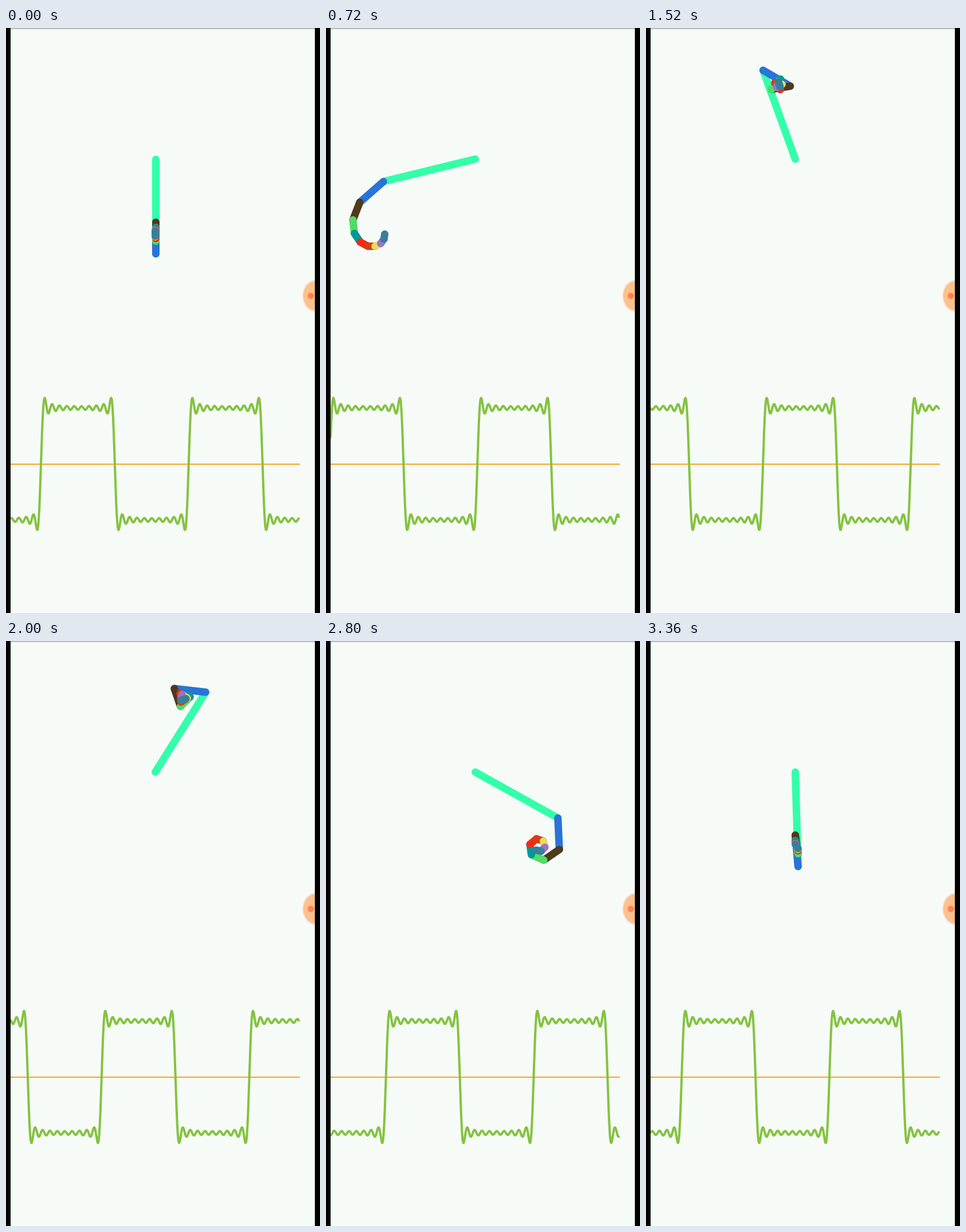
Write a matplotlib script that moves like this. It is 548 by 1022 pixels and loops after 3400 ms.

```python
import numpy as np
import matplotlib.pyplot as plt
from matplotlib.animation import FuncAnimation
from matplotlib.patches import Ellipse, Rectangle

W, H, DPI = 548, 1022, 64
FRAMES, INTERVAL = 85, 40

PIVOT = (260.5, 229)
RADIUS = 165
COLORS = ["#33ffaa", "#2874d8", "#50391c", "#4fdd64", "#009999",
          "#f22c14", "#d43e10", "#e8dc60", "#a070cc", "#34809a"]
ORDERS = 2 * np.arange(len(COLORS)) + 1

WAVE_MID, WAVE_AMP = 761.6, 124.5
WAVE_START, WAVE_PERIOD = 61, 257.8
WAVE_X = np.arange(8, 511.5, 0.5)

# The rotation speed drifts a little around one turn per loop.
KEY_FRAMES = [0, 11, 26, 38, 50, 70, 84]
KEY_TURN = [0, 46.7, 110, 160.1, 212.2, 299.1, 358.3]


def px(width):
    return width * 72 / DPI


def turn(frame):
    return np.radians(np.interp(frame, KEY_FRAMES, KEY_TURN))


def arm_joints(angle):
    x = np.cumsum(RADIUS / ORDERS * np.cos(ORDERS * angle))
    y = np.cumsum(RADIUS / ORDERS * np.sin(ORDERS * angle))
    return (PIVOT[0] + np.append(0, x), PIVOT[1] + np.append(0, y))


def wave(shift):
    phase = 2 * np.pi * (WAVE_X - WAVE_START) / WAVE_PERIOD + shift
    series = (np.sin(np.outer(ORDERS, phase)) / ORDERS[:, None]).sum(axis=0)
    return WAVE_MID - WAVE_AMP * series


fig = plt.figure(figsize=(W / DPI, H / DPI), dpi=DPI, facecolor="#f7fbf7")
ax = fig.add_axes([0, 0, 1, 1])
ax.set_xlim(0, W)
ax.set_ylim(H, 0)
ax.axis("off")


def rect(x, y, w, h, color, z):
    ax.add_patch(Rectangle((x, y), w, h, fc=color, lw=0, zorder=z))


def oval(x, y, rx, ry, color, z):
    ax.add_patch(Ellipse((x, y), 2 * rx, 2 * ry, fc=color, lw=0, zorder=z))


rect(0, 0, W, 2, "#b9bab9", 1)
rect(0, 0, 8, H, "black", 9)
rect(539, 0, 9, H, "black", 9)

oval(540.5, 468, 23.5, 28, "#fbe3cd", 5)
oval(540.5, 468, 21.5, 26, "#fcc18e", 6)
oval(532, 468, 5.5, 5.5, "#ff8350", 7)

ax.plot([8, 513], [761.7, 761.7], color="#f5a623", lw=px(2),
        solid_capstyle="butt", zorder=2)
curve, = ax.plot([], [], color="#84c341", lw=px(4),
                 solid_capstyle="round", solid_joinstyle="round", zorder=3)
arms = [ax.plot([], [], color=c, lw=px(13), solid_capstyle="round",
                zorder=4 + i / 20)[0] for i, c in enumerate(COLORS)]


def draw(frame):
    angle = turn(frame)
    x, y = arm_joints(np.pi / 2 + angle)
    for i, arm in enumerate(arms):
        arm.set_data(x[i:i + 2], y[i:i + 2])
    curve.set_data(WAVE_X, wave(angle))
    return arms + [curve]


anim = FuncAnimation(fig, draw, frames=FRAMES, interval=INTERVAL,
                     repeat=True, repeat_delay=0)
plt.show()
```
